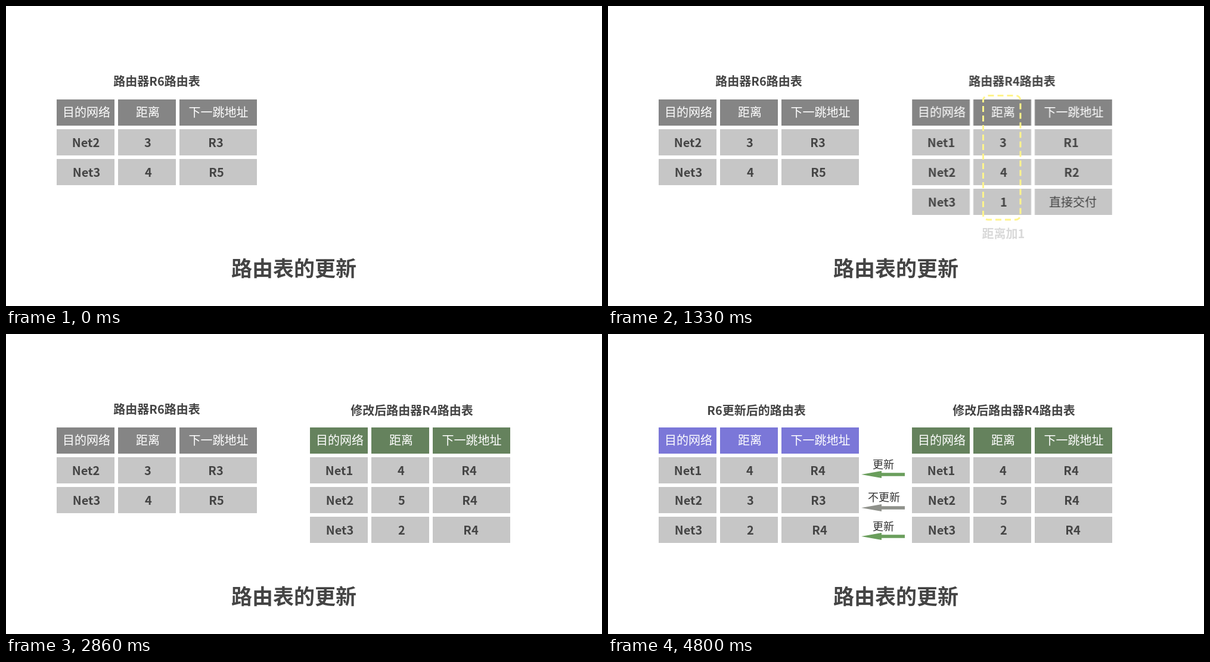
These frames come from a looping animation (1000 by 504 pixels, 5900 ms). An HTML page:

```html
<!DOCTYPE html>
<html lang="zh-CN">
<head>
<meta charset="utf-8">
<title>路由表的更新</title>
<style>
  html, body { margin: 0; width: 100%; height: 100%; overflow: hidden; background: #fff; }
  svg { display: block; width: 100%; height: 100%; }
  text { font-family: "Noto Sans CJK SC", "Noto Sans CJK", "Noto Sans CJK JP", sans-serif; font-size: 20px; text-anchor: middle; fill: #444; }
  .bold { font-weight: 700; }
  .medium { font-weight: 500; }
  .head { fill: #fff; }
  .main { font-size: 35px; font-weight: 700; }
  .note { font-size: 18px; fill: #333; }
  .frame { fill: none; stroke: #fff48c; stroke-width: 3; stroke-dasharray: 10 6; }

  .anim { animation: 5.9s linear infinite; }
  #r4 { animation-name: r4; }
  #r4new { animation-name: r4new; }
  #r6 { animation-name: r6; }
  #r6new { animation-name: r6new; }
  #frame1 { animation-name: frame1; }
  #frame2 { animation-name: frame2; }
  #label1 { animation-name: label1; }
  #label2 { animation-name: label2; }
  #arrow1 { animation-name: arrow1; }
  #arrow2 { animation-name: arrow2; }
  #arrow3 { animation-name: arrow3; }

  /* Percentages are times in a 5900 ms loop; each step lasts 30 ms. */
  @keyframes r4 {
    0%, 10.136% { opacity: 0; transform: translateX(42.5px); animation-timing-function: steps(5, start); }
    12.678%, 39.797% { opacity: 1; transform: translateX(0); animation-timing-function: steps(13, start); }
    46.407%, 100% { opacity: 0; transform: translateX(0); }
  }
  @keyframes r4new {
    0%, 42.339% { opacity: 0; animation-timing-function: steps(13, start); }
    48.949%, 100% { opacity: 1; }
  }
  @keyframes r6 {
    0%, 73.186% { opacity: 1; animation-timing-function: steps(13, start); }
    79.797%, 100% { opacity: 0; }
  }
  @keyframes r6new {
    0%, 73.186% { opacity: 0; animation-timing-function: steps(17, start); }
    81.831%, 100% { opacity: 1; }
  }
  @keyframes frame1 {
    0%, 19.458% { opacity: 0; animation-timing-function: steps(3, start); }
    20.983%, 39.797% { opacity: 1; animation-timing-function: steps(5, start); }
    42.339%, 100% { opacity: 0; }
  }
  @keyframes label1 {
    0%, 22.508% { opacity: 0; animation-timing-function: steps(5, start); }
    25.051%, 39.797% { opacity: 1; animation-timing-function: steps(5, start); }
    42.339%, 100% { opacity: 0; }
  }
  @keyframes frame2 {
    0%, 30.136% { opacity: 0; animation-timing-function: steps(3, start); }
    31.661%, 39.797% { opacity: 1; animation-timing-function: steps(5, start); }
    42.339%, 100% { opacity: 0; }
  }
  @keyframes label2 {
    0%, 31.153% { opacity: 0; animation-timing-function: steps(8, start); }
    35.22%, 39.797% { opacity: 1; animation-timing-function: steps(5, start); }
    42.339%, 100% { opacity: 0; }
  }
  @keyframes arrow1 {
    0%, 63.017% { opacity: 0; transform: translateX(10px); animation-timing-function: steps(7, start); }
    66.576%, 100% { opacity: 1; transform: translateX(0); }
  }
  @keyframes arrow2 {
    0%, 66.576% { opacity: 0; transform: translateX(12px); animation-timing-function: steps(7, start); }
    70.136%, 100% { opacity: 1; transform: translateX(0); }
  }
  @keyframes arrow3 {
    0%, 70.136% { opacity: 0; transform: translateX(12px); animation-timing-function: steps(6, start); }
    73.186%, 100% { opacity: 1; transform: translateX(0); }
  }
</style>
</head>
<body>
<svg id="stage" viewBox="0 0 1000 504" xmlns="http://www.w3.org/2000/svg">
  <text class="main" x="483" y="454">路由表的更新</text>
  <g id="r6" class="anim"></g>
  <g id="r6new" class="anim"></g>
  <g id="r4" class="anim"></g>
  <g id="r4new" class="anim"></g>
  <rect id="frame1" class="anim frame" x="629.5" y="150.5" width="62.5" height="208.5" rx="8"/>
  <text id="label1" class="anim bold" x="663.5" y="389.5">距离加1</text>
  <rect id="frame2" class="anim frame" x="723" y="150.5" width="116" height="208.5" rx="14"/>
  <text id="label2" class="anim bold" x="782.5" y="389.5">下一跳变R4</text>
  <g id="arrow1" class="anim"></g>
  <g id="arrow2" class="anim"></g>
  <g id="arrow3" class="anim"></g>
</svg>
<script>
  const NS = 'http://www.w3.org/2000/svg';
  const byId = id => document.getElementById(id);

  function add(parent, tag, attrs, content) {
    const el = document.createElementNS(NS, tag);
    for (const key in attrs) el.setAttribute(key, attrs[key]);
    if (content) el.textContent = content;
    parent.appendChild(el);
  }

  const columns = [[85, 97], [188, 97], [291, 130]];
  const headings = ['目的网络', '距离', '下一跳地址'];
  const headX = [135, 238, 356.5];
  const cellX = [[134, 238, 352], [135, 239, 353], [135, 239, 355]];

  function table(id, left, title, titleX, titleY, color, rows) {
    const g = byId(id);
    add(g, 'text', { x: titleX, y: titleY, class: 'bold' }, title);
    [headings, ...rows].forEach((row, r) => row.forEach((value, c) => {
      const [x, width] = columns[c];
      const isHead = r === 0;
      const isWord = value === '直接交付';
      add(g, 'rect', { x: left + x, y: 157 + 50 * r, width, height: 44, fill: isHead ? color : '#c6c6c6' });
      add(g, 'text', {
        x: left + (isHead ? headX : cellX[r - 1])[c],
        y: isHead ? 185.5 : 186.5 + 50 * r,
        class: isHead ? 'head' : isWord ? 'medium' : 'bold'
      }, value);
    }));
  }

  function arrow(id, y, color, label, labelX, labelY) {
    const g = byId(id);
    add(g, 'text', { x: labelX, y: labelY, class: 'note' }, label);
    add(g, 'path', {
      d: `M425 ${y}l34 -6v3.3h39v5.4h-39v3.3z`,
      fill: color
    });
  }

  table('r6', 0, '路由器R6路由表', 253, 134, '#858585',
    [['Net2', '3', 'R3'], ['Net3', '4', 'R5']]);
  table('r6new', 0, 'R6更新后的路由表', 249, 136, '#7b77d8',
    [['Net1', '4', 'R4'], ['Net2', '3', 'R3'], ['Net3', '2', 'R4']]);
  table('r4', 425, '路由器R4路由表', 678, 134, '#858585',
    [['Net1', '3', 'R1'], ['Net2', '4', 'R2'], ['Net3', '1', '直接交付']]);
  table('r4new', 425, '修改后路由器R4路由表', 681, 136, '#65825d',
    [['Net1', '4', 'R4'], ['Net2', '5', 'R4'], ['Net3', '2', 'R4']]);

  arrow('arrow1', 236, '#6a9e5c', '更新', 462, 226);
  arrow('arrow2', 292, '#8f918b', '不更新', 463, 281);
  arrow('arrow3', 340, '#6a9e5c', '更新', 462, 330);
</script>
</body>
</html>
```
